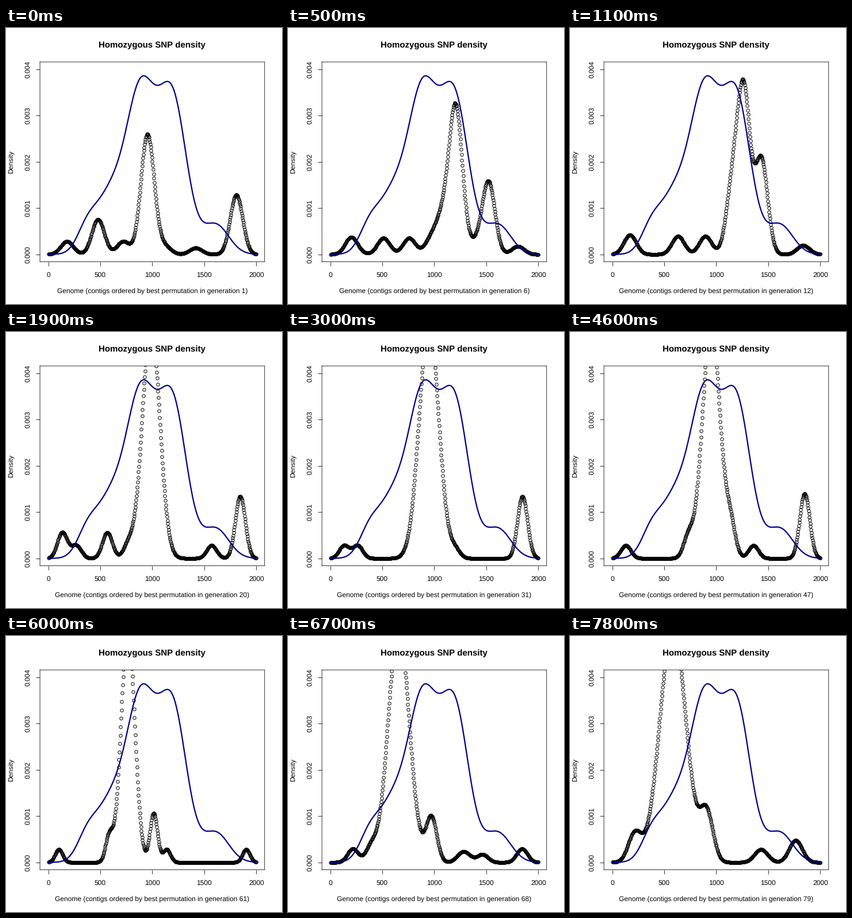
A matplotlib script that plays this animation: 480x480 px, repeating every 7.9 s.

```python
import numpy as np
import matplotlib.pyplot as plt
from matplotlib.animation import FuncAnimation

SIZE, DPI = 480, 72
LEFT, RIGHT, TOP, BOTTOM = 59.04, 449.76, 59.04, 406.56
GENERATIONS = 79
UNIT = 0.00028  # height of the bump made by one contig

plt.rcParams.update({
    "font.family": "Liberation Sans",
    "font.size": 12,
    "text.hinting": "none",
    "text.hinting_factor": 1,
    "path.snap": False,
})


def bells(x, centre, sd):
    return np.exp(-0.5 * ((x[:, None] - centre) / sd) ** 2)


def state(gen, sd, peak, width, bumps, height=0.0051):
    """One main peak plus side bumps {position: contigs}, in genome order."""
    rows = [(p, n * UNIT, sd) for p, n in bumps.items()]
    pos, high, wide = np.array(sorted(rows + [(peak, height, width)])).T
    return gen, peak, pos, high, wide


STATES = [
    state(1, 60, 953, 64, {180: 1, 478: 2.7, 720: 1, 1120: 0.6, 1418: 0.5,
                           1808: 4.6}, 0.0026),
    state(12, 60, 1262, 62, {170: 1.5, 632: 1.4, 895: 1.4, 1150: 4.7,
                             1432: 7.3, 1835: 0.7}, 0.0035),
    state(20, 48, 986, 83, {135: 2, 268: 1, 567: 2, 770: 1, 1570: 1,
                            1845: 4.8}),
    state(31, 48, 947, 93, {133: 1, 262: 1, 1200: 0.6, 1847: 4.8}),
    state(47, 48, 949, 84, {130: 1, 730: 1.6, 1135: 2.3, 1357: 1, 1849: 5}),
    state(61, 36, 764, 65, {102: 1, 585: 2, 1013: 3.8, 1138: 1, 1902: 1}),
    state(79, 63, 581, 125, {215: 2.2, 905: 3.7, 1430: 1, 1763: 1.7}),
]


def density(x, gen):
    i = min(sum(s[0] <= gen for s in STATES), len(STATES) - 1)
    (g0, _, p0, h0, w0), (g1, peak, p1, h1, w1) = STATES[i - 1:i + 1]
    s = (gen - g0) / (g1 - g0)
    t = min(1, 1.5 * s)  # settle early, then only fine changes

    def blend(a, b):
        return a + (b - a) * t

    # carry mass from one mixture to the next in genome order
    c0, c1 = np.cumsum(h0 * w0), np.cumsum(h1 * w1)
    edges = np.unique(np.concatenate([[0], c0 / c0[-1], c1 / c1[-1]]))
    mid = (edges[1:] + edges[:-1]) / 2
    a = np.searchsorted(c0 / c0[-1], mid)
    b = np.searchsorted(c1 / c1[-1], mid)
    pos, sd = blend(p0[a], p1[b]), blend(w0[a], w1[b])
    mass = np.diff(edges) * blend(c0[-1], c1[-1])

    # each generation reshuffles a little; once settled, only past the peak
    shake = np.random.default_rng(gen).normal(0, 28, pos.size)
    loose = (t < 1) | (pos > peak + 100)
    pos = np.clip(pos + shake * np.sin(np.pi * s) * loose, 90, 1910)
    return bells(x, pos, sd) @ (mass / sd)


def expected(x):
    """Reference curve: position, height in 1e-5 and spread of its parts."""
    parts = [(370, 48, 95), (590, 120, 140), (890, 345, 140),
             (1195, 330, 135), (1610, 64, 125)]
    pos, high, sd = np.array(parts, float).T
    return bells(x, pos, sd) @ high * 1e-5


fig = plt.figure(figsize=(SIZE / DPI, SIZE / DPI), dpi=DPI, facecolor="white")
ax = fig.add_axes([LEFT / SIZE, 1 - BOTTOM / SIZE,
                   (RIGHT - LEFT) / SIZE, (BOTTOM - TOP) / SIZE])
ax.set_xlim(-80, 2080)
ax.set_ylim(-0.00016, 0.00416)
ax.set_xticks(range(0, 2001, 500))
ax.set_yticks(np.arange(5) / 1000)
ax.tick_params(length=7.2, width=0.8, labelbottom=False, labelleft=False)
for spine in ax.spines.values():
    spine.set_linewidth(0.8)


def label(x, y, text, rotation=0, **style):
    return fig.text(x / SIZE, 1 - y / SIZE, text, rotation=rotation,
                    ha="center", va="baseline", rotation_mode="anchor", **style)


MID_X, MID_Y = (LEFT + RIGHT) / 2, (TOP + BOTTOM) / 2
for v in range(0, 2001, 500):
    label(73.51 + v * 0.18089, 432.6, str(v))
for v in range(5):
    label(41.8, 393.69 - v * 80.445, f"{v / 1000:.3f}", 90)
label(MID_X, 34.8, "Homozygous SNP density", fontsize=14.7, fontweight="bold")
label(12.9, MID_Y, "Density", 90)
caption = label(MID_X, 462, "")

genome = np.linspace(4, 2000, 512)
dots, = ax.plot([], [], "o", ms=5.4, mew=1, mfc="none", mec="black", zorder=2)
ax.plot(genome, expected(genome), color="#00008b", lw=2.25, zorder=3)


def draw(i):
    gen = i + 1
    dots.set_data(genome, density(genome, gen))
    caption.set_text(
        f"Genome (contigs ordered by best permutation in generation {gen})")
    return dots, caption


anim = FuncAnimation(fig, draw, frames=GENERATIONS, interval=100, repeat=True)
plt.show()
```
